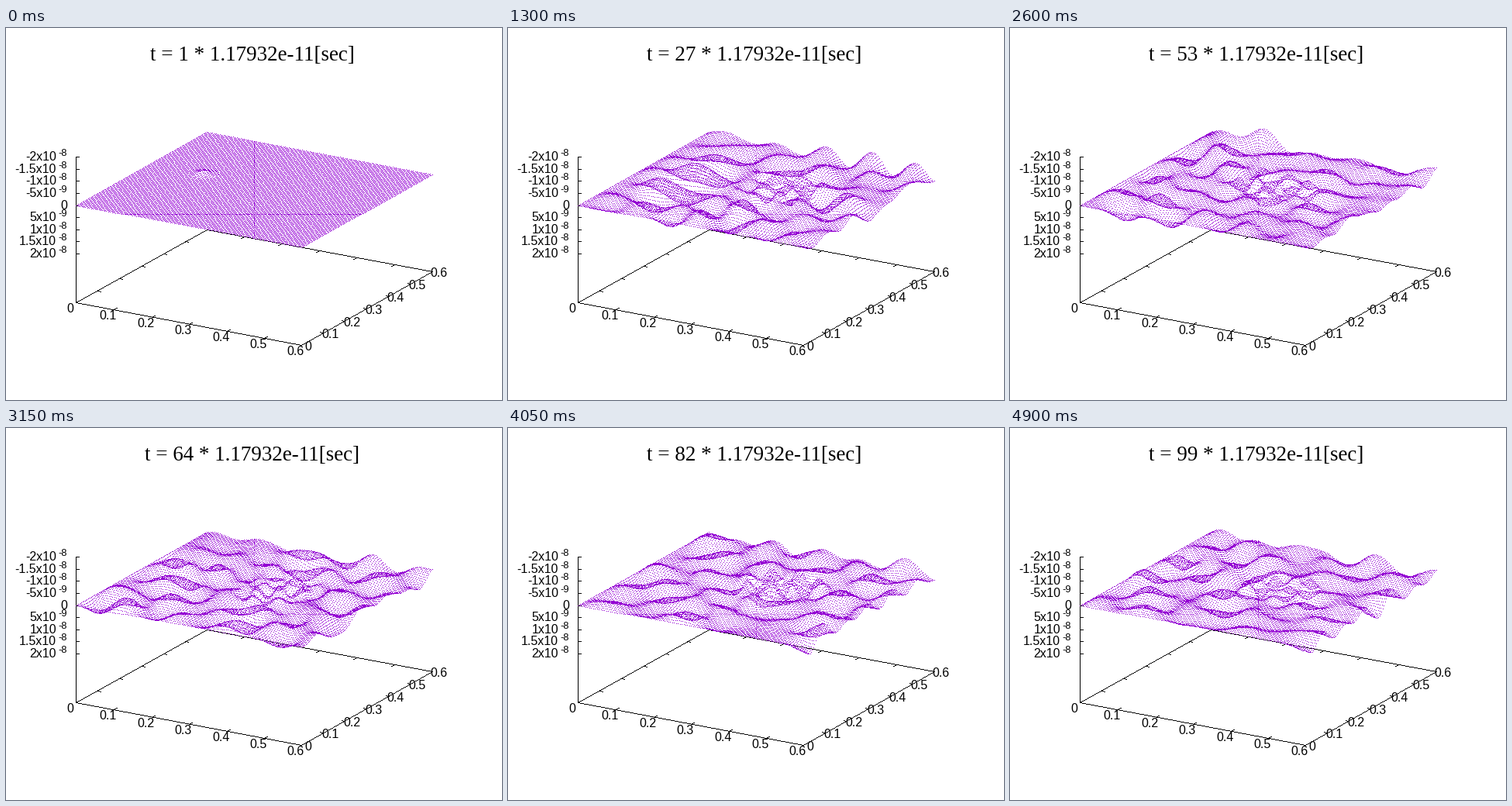
These frames come from a looping animation (640x480 px, 4950 ms). A matplotlib script:

```python
import numpy as np
import matplotlib.pyplot as plt
from matplotlib.animation import FuncAnimation

W, H, DPI = 640, 480, 100
FRAMES, STEPS = 99, 10
N = 120                      # cells per side of the 0.6 m cavity
BLACK, VIOLET = (0, 0, 0, 255), (0x94, 0, 0xD3, 255)

# orthographic view (60, 30) in pixels, centred on the canvas
SX, SY = 337.0, 219.0
U = np.array([SX * np.cos(np.pi / 6), SY * 0.25])
V = np.array([SX * 0.5, -SY * 0.5 * np.cos(np.pi / 6)])
Z_SPAN = SY * np.cos(np.pi / 6)
Z_UNIT = Z_SPAN / 6          # pixels per 1e-8
BASE = 4 * Z_UNIT            # the floor lies below the zero plane


def project(u, v, drop=0.0):
    """Pixel of (u, v) in the unit square, drop pixels below z = 0."""
    x = (u - 0.5) * U[0] + (v - 0.5) * V[0]
    y = (u - 0.5) * U[1] + (v - 0.5) * V[1] + drop - Z_UNIT
    return W // 2 + np.trunc(x), H // 2 + np.trunc(y)


def pulse(step):
    """Sine burst in a Gaussian envelope, timed by distance travelled."""
    s = 0.0035 * step
    return -80 * np.exp(-((s - 0.33) / 0.13) ** 2 / 2) \
        * np.cos(2 * np.pi * (s - 0.352) / 0.11)


def simulate():
    """Wave from one pulse, two fixed and two free walls, and a slow disc."""
    c = np.arange(N + 1) / N
    u, v = np.meshgrid(c, c, indexing="ij")
    disc = np.hypot(u - 0.57, v - 0.55) < 0.17
    speed = np.where(disc, 0.49 / 4, 0.49)
    loss = 0.0002
    now, old = np.zeros_like(u), np.zeros_like(u)
    fields = []
    for step in range(1, FRAMES * STEPS + 1):
        p = np.pad(now, 1, mode="edge")
        lap = p[2:, 1:-1] + p[:-2, 1:-1] + p[1:-1, 2:] + p[1:-1, :-2] - 4 * now
        new = (2 * now - (1 - loss) * old + speed * lap) / (1 + loss)
        new[28, 68] += pulse(step)
        new[0, :] = new[:, 0] = 0
        old, now = now, new
        if step % STEPS == 0:
            fields.append(now)
    return u, v, fields


u, v, fields = simulate()

fig = plt.figure(figsize=(W / DPI, H / DPI), dpi=DPI, facecolor="white")
ax = fig.add_axes([0, 0, 1, 1])
ax.set_xlim(0, W)
ax.set_ylim(H, 0)
ax.axis("off")
frame_layer = np.zeros((H, W, 4), np.uint8)


def line(a, b):
    """One-pixel line without smoothing."""
    n = int(max(abs(b[0] - a[0]), abs(b[1] - a[1]))) + 1
    x = np.rint(np.linspace(a[0], b[0], n)).astype(int)
    y = np.rint(np.linspace(a[1], b[1], n)).astype(int)
    frame_layer[y, x] = BLACK


def label(x, y, s, px=16, ha="center", font="Liberation Sans"):
    return ax.text(x, y, s, fontsize=px * 72 / DPI, family=font, ha=ha,
                   va="baseline", color="black", zorder=4)


def tick(p, step):
    line(p, (p[0] + step[0], p[1] + step[1]))


def draw_axes():
    corners = [project(a, b, BASE) for a, b in ((0, 0), (1, 0), (1, 1), (0, 1))]
    for a, b in zip(corners, corners[1:] + corners[:1]):
        line(a, b)
    line(project(0, 0, -2 * Z_UNIT), corners[0])

    du, dv = U * 0.015, V * 0.025
    for i in range(7):
        f = i / 6
        s = f"{i / 10:g}"
        p, r = project(f, 0, BASE), project(1, f, BASE)
        tick(p, dv)
        tick(project(f, 1, BASE), -dv)
        tick(project(0, f, BASE), du)
        tick(r, -du)
        label(p[0] - 7.5, p[1] + 13, s)
        label(r[0] + 9, r[1] + 7, s)

    for k in range(-4, 5):
        x, y = project(0, 0, k * Z_UNIT / 2)
        tick((x, y), (4, 0))
        if k == 0:
            label(79, y + 5, "0", ha="right")
            continue
        mant, power = (5 * k, -9) if abs(k) == 1 else (k / 2, -8)
        label(65, y + 5, f"{mant:g}x10", ha="right")
        label(79, y - 1, str(power), px=12.8, ha="right")


draw_axes()
title = label(317.5, 42, "", px=27, font="Liberation Serif")
picture = ax.imshow(frame_layer, extent=(0, W, H, 0),
                    interpolation="nearest", aspect="auto", zorder=3)


def draw(n):
    z = fields[n]
    x, y = project(u, v, z)
    seen = np.abs(z) <= 2 * Z_UNIT
    layer = frame_layer.copy()
    layer[y[seen].astype(int), x[seen].astype(int)] = VIOLET
    picture.set_data(layer)
    title.set_text(f"t = {n + 1} * 1.17932e-11[sec]")
    return picture, title


anim = FuncAnimation(fig, draw, frames=FRAMES, interval=50, repeat=True)
plt.show()
```
